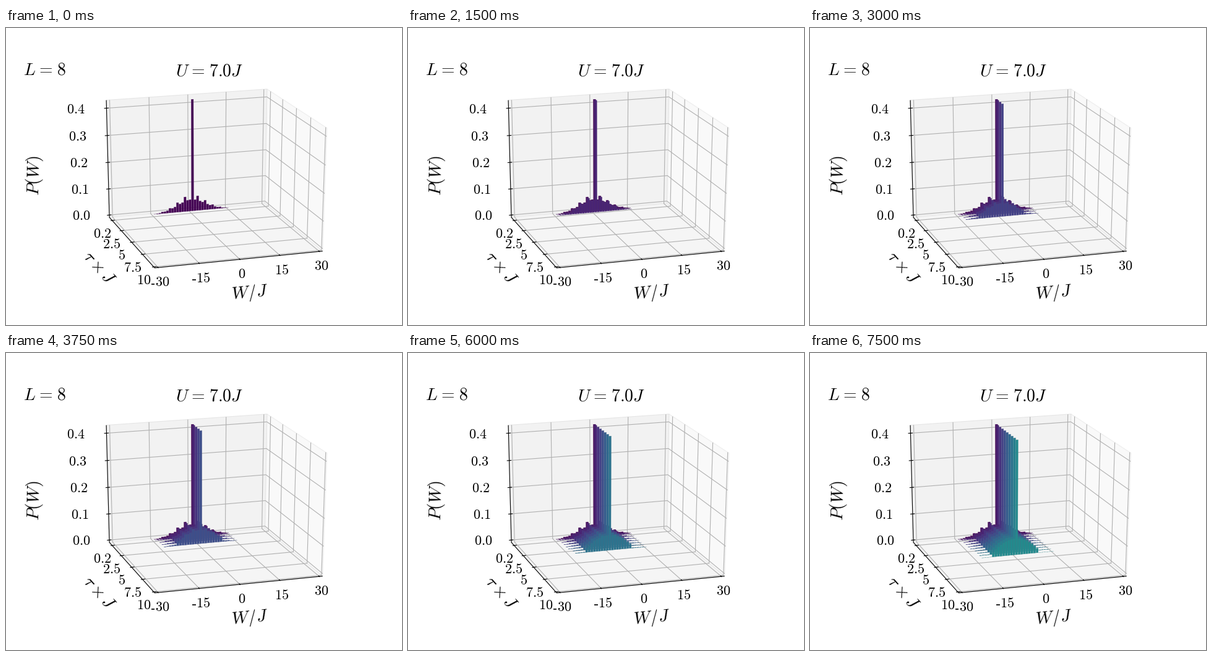
Recreate the animation shown at these times as a matplotlib script. Size 640 by 480 pixels, loop 8 s.

```python
import numpy as np
import matplotlib.pyplot as plt
from matplotlib.animation import FuncAnimation
from matplotlib.collections import LineCollection, PolyCollection

plt.rcParams["mathtext.fontset"] = "cm"

# Box limits: work, quench time, probability
X0, X1 = -31.25, 31.25
T0, T1 = -0.5, 10.2
Z0, Z1 = -0.009, 0.429
X_TICKS = range(-30, 31, 15)
T_TICKS = [0.2, 2.5, 5, 7.5, 10]
Z_TICKS = np.linspace(0.4, 0, 5)
TIMES = [0.2, 0.3, *np.arange(0.5, 5, 0.5)]


def fit_camera(anchors):
    """Least-squares perspective matrix from box points to screen points."""
    rows, rhs = [], []
    for (x, t, z), screen in anchors:
        p = np.array([x / 30, t / 10, z / 0.4, 1])
        for i, s in enumerate(np.array(screen) / 640):
            row = np.zeros(11)
            row[4 * i:4 * i + 4] = p
            row[8:] = -s * p[:3]
            rows.append(row)
            rhs.append(s)
    sol = np.linalg.lstsq(np.array(rows), np.array(rhs), rcond=None)[0]
    return np.append(sol, 1).reshape(3, 4)


# Visible box corners, then points along the edges
CAMERA = fit_camera([
    ((X0, T0, Z0), (167, 306)), ((X1, T0, Z0), (418.3, 283)),
    ((X1, T1, Z0), (511.5, 361)), ((X0, T1, Z0), (240, 387.5)),
    ((X0, T0, Z1), (162, 117)), ((X1, T0, Z1), (421.5, 98)),
    ((X1, T1, Z1), (518, 160.5)),
    ((0, T1, Z0), (379, 374)), ((0, T0, Z1), (294, 107.8)),
    ((X1, 2.5, Z1), (448, 116)), ((X1, 7.5, Z1), (493, 145)),
    ((X0, T0, 0.2), (164.6, 217)), ((X1, T0, 0.2), (420, 197)),
    ((X1, T1, 0.2), (514.6, 268)),
])


def project(x, t, z):
    u, v, w = CAMERA @ [x / 30, t / 10, z / 0.4, 1]
    return 640 * u / w, 640 * v / w


def path(*points):
    return [project(*p) for p in points]


fig = plt.figure(figsize=(6.4, 4.8), dpi=100, facecolor="white")
ax = fig.add_axes([0, 0, 1, 1])
ax.set_xlim(0, 640)
ax.set_ylim(480, 0)
ax.axis("off")


def draw_box():
    back = path((X0, T0, Z0), (X1, T0, Z0), (X1, T0, Z1), (X0, T0, Z1))
    side = path((X1, T0, Z0), (X1, T1, Z0), (X1, T1, Z1), (X1, T0, Z1))
    floor = path((X0, T0, Z0), (X1, T0, Z0), (X1, T1, Z0), (X0, T1, Z0))
    ax.add_collection(PolyCollection([side, back, floor], zorder=1, linewidths=0.8,
                                     facecolors=["#f9f9f9", "#f2f2f2", "#f5f5f5"],
                                     edgecolors=["#ededed", "#e6e6e6", "#e9e9e9"]))
    grid = [path((x, T0, Z1), (x, T0, Z0), (x, T1, Z0)) for x in X_TICKS]
    grid += [path((X0, t, Z0), (X1, t, Z0), (X1, t, Z1)) for t in T_TICKS]
    grid += [path((X0, T0, z), (X1, T0, z), (X1, T1, z)) for z in Z_TICKS]
    ax.add_collection(LineCollection(grid, colors="#b0b0b0", linewidths=0.8, zorder=2))

    axes = [path((X0, T0, Z1), (X0, T0, Z0), (X0, T1, Z0), (X1, T1, Z0))]
    axes += [path((x, T1 - 0.18, Z0), (x, T1 + 0.09, Z0)) for x in X_TICKS]
    axes += [path((X0 - 0.6, t, Z0), (X0 + 1.05, t, Z0)) for t in T_TICKS]
    axes += [path((X0 - 0.9, T0, z), (X0 + 0.8, T0, z)) for z in Z_TICKS]
    ax.add_collection(LineCollection(axes, colors="black", linewidths=0.8, zorder=3))


def label(x, y, text, size=16, angle=0):
    ax.text(x, y, f"${text}$", fontsize=size, rotation=angle,
            ha="center", va="center", zorder=20)


def draw_text():
    eq = r"\hspace{0.08}=\hspace{0.08}"
    label(62, 68, f"L{eq}8", 20)
    label(329, 69, f"U{eq}7.0J", 20)
    label(394.5, 429, "W/J", 20, 5.5)
    label(46, 238.5, "P(W)", 20, 89)
    label(150.5, 387.5, r"\tau\times J", 20, -48)
    for z, x in zip(Z_TICKS, np.linspace(113.3, 121.5, 5)):
        label(x, project(X0, T0, z)[1] + 2, f"{z:.1f}")
    for t in T_TICKS:
        x, y = project(X0, t, Z0)
        label(x - 16, y + 22, f"{t:g}")
    for n in X_TICKS:
        x, y = project(n, T1, Z0)
        shift = 3.5 if n < 0 else 0
        label(x + 3 + shift, y + 24, abs(n))
        if n < 0:  # short hyphen instead of the wide minus sign
            ax.plot([x - 11, x - 5.5], [y + 26.5] * 2, color="black", lw=1.2,
                    solid_capstyle="butt", zorder=20)


def height(n, k):
    """Probability of work bin n in slice k: rippled bell turning into a dome."""
    if n == 0:
        return 0.42
    c = abs(n + 0.5)
    ripple = 1 + 0.25 * np.cos(2 * np.pi * (c - 2.5) / 3)
    early = 0.05 * np.exp(-(c / 7.5) ** 2) * ripple
    late = 0.06 * (1 - (c / 10) ** 2) if c < 9 else 0
    mix = k / 10
    edge = min(1, max(0, (14 - c) / 2))
    return ((1 - mix) * early + mix * late) * edge


def make_slice(k, t):
    color = np.array(plt.cm.viridis(k / 21)[:3])
    bars = []
    for n in range(-round(15 - 0.22 * k), 15):
        a, b, h = n + 0.08, n + 0.92, height(n, k)
        bars.append(path((a, t, 0), (b, t, 0), (b, t, h), (a, t, h)))
    return ax.add_collection(PolyCollection(bars, facecolors=[color], linewidths=0.3,
                                            edgecolors=[0.8 * color + 0.09], zorder=5 + k))


draw_box()
draw_text()
slices = [make_slice(k, t) for k, t in enumerate(TIMES)]


def update(frame):
    shown = frame // 3
    for k, s in enumerate(slices):
        s.set_visible(k <= shown)
    return slices


anim = FuncAnimation(fig, update, frames=32, interval=250, repeat=True,
                     repeat_delay=0, blit=False)
plt.show()
```
